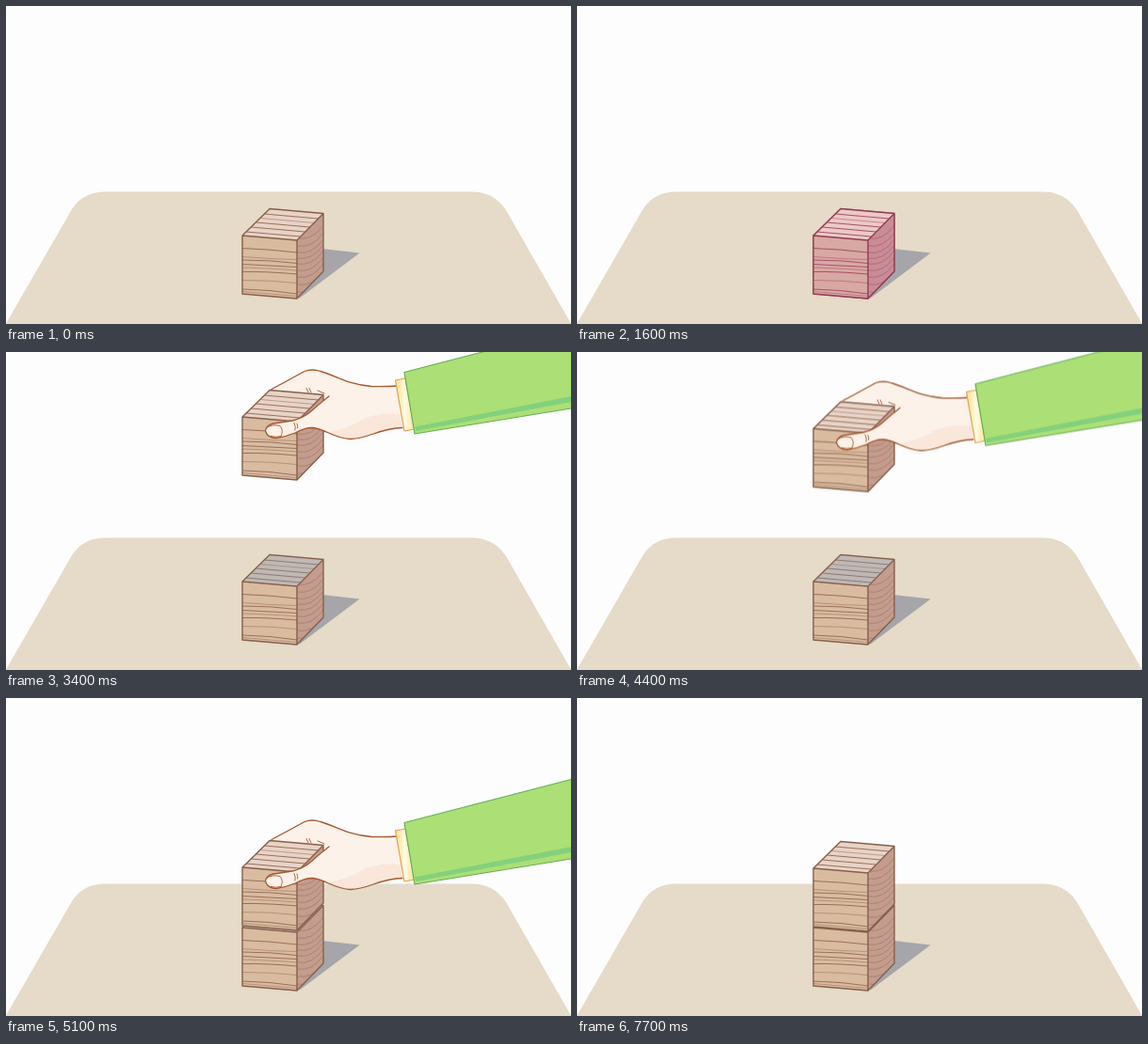
These frames come from a looping animation (600x338 px, 8000 ms). An HTML page:

```html
<!DOCTYPE html>
<html lang="en">
<head>
<meta charset="utf-8">
<title>Stacking blocks</title>
<style>
  html, body { margin: 0; width: 100%; height: 100%; overflow: hidden; background: #fdfdfe; }
  svg { display: block; width: 100vw; height: 100vh; }

  .block { --front: #d9bba0; --top: #e8d3c7; --side: #c49c8e; --edge: #85604b; --grain: #9a705c; }
  .block.pink { --front: #d89fa5; --top: #eec4c8; --side: #cc849b; --edge: #9a2759; --grain: #b0416f; }
  .front { fill: var(--front); }
  .top { fill: var(--top); }
  .side { fill: var(--side); }
  .edge { fill: none; stroke: var(--edge); stroke-width: 1.4; stroke-linejoin: round; }
  .grain { fill: none; stroke: var(--grain); stroke-width: 1; }
  .soft { stroke-width: .8; opacity: .7; }

  .skin { fill: #fcf2e9; }
  .blush { fill: #fae7da; }
  .line { fill: none; stroke: #a4572f; stroke-width: 1.3; stroke-linecap: round; stroke-linejoin: round; }
  .thin { stroke-width: .9; }

  .pink { animation: pulse 8s infinite; }
  .lower { animation: lower 8s infinite; }
  .appear { animation: appear 8s linear infinite; }
  .hand { animation: hand 8s linear infinite; }

  @keyframes pulse {
    0%, 3.75% { opacity: 0; animation-timing-function: cubic-bezier(.37, 0, .63, 1); }
    15.3125% { opacity: 1; animation-timing-function: cubic-bezier(.37, 0, .63, 1); }
    26.875%, 100% { opacity: 0; }
  }
  @keyframes lower {
    0%, 52.375% { transform: translateY(0); animation-timing-function: cubic-bezier(.37, 0, .63, 1); }
    64.5%, 100% { transform: translateY(112px); }
  }
  @keyframes appear {
    0%, 31.875% { opacity: 0; }
    41.875%, 100% { opacity: 1; }
  }
  @keyframes hand {
    0%, 31.875% { opacity: 0; }
    41.875%, 72.5% { opacity: 1; }
    86.25%, 100% { opacity: 0; }
  }
</style>
</head>
<body>
<svg viewBox="0 0 600 338" preserveAspectRatio="none">
  <defs>
    <linearGradient id="cuffFill">
      <stop offset="0" stop-color="#ffdf83"/>
      <stop offset=".5" stop-color="#fffbe6"/>
      <stop offset="1" stop-color="#fce293"/>
    </linearGradient>
    <clipPath id="sideClip"><path d="M309 249L337 220.500V282L309 311Z"/></clipPath>
    <clipPath id="blockClip"><path d="M250 69L279.500 39.500L338 44.500V107.500L309.500 137L250 132Z"/></clipPath>

    <g id="block">
      <path class="front" d="M251 244L309 249V311L251 306Z"/>
      <path class="top" d="M251 244L280 215.500L337 220.500L309 249Z"/>
      <path class="side" d="M309 249L337 220.500V282L309 311Z"/>
      <path class="grain" d="M251 257.500Q280 258.500 309 262M251 270Q282 270 309 273.500M251 274.500Q280 276 309 277.500M251 282.500Q276 282 309 285M251 301Q280 301.500 309 306"/>
      <path class="grain soft" d="M251 266.500Q280 269 309 269.500M251 278Q285 279 309 281M251 291.500Q282 291.500 309 294.500M251 303.500L309 308.500"/>
      <path class="grain" d="M274.500 221L331.500 226M265.500 230L322.500 235M260.500 235L317.500 240M255 240L312.500 245"/>
      <path class="grain soft" d="M270 225.500L327 230.500"/>
      <g class="grain soft" clip-path="url(#sideClip)">
        <path id="arc" d="M309 247Q325 250 337 233"/>
        <use href="#arc" y="8"/><use href="#arc" y="15"/><use href="#arc" y="21"/>
        <use href="#arc" y="27"/><use href="#arc" y="34"/><use href="#arc" y="41"/>
        <use href="#arc" y="49"/><use href="#arc" y="57"/>
      </g>
      <path class="edge" d="M251 244L280 215.500L337 220.500V282L309 311L251 306ZL309 249V311M309 249L337 220.500"/>
    </g>

    <path id="thumb" class="skin" d="M343 47Q334 54 324 63Q316 70 304 73L284 76Q276 78 275.500 84Q278 91.500 287 91.500Q297 90 307 86Q317 80.500 325 80.500C338 81 348 92 366 92.500V47Z"/>
    <g id="contour">
      <path class="line" d="M343 47Q334 54 324 63Q316 70 304 73L284 76Q276 78 275.500 84Q278 91.500 287 91.500Q297 90 307 86Q317 80.500 325 80.500C338 81 348 92 366 92.500C386 92 396 81 421 80.500"/>
      <path class="line thin" d="M277.500 80Q283 76.500 291 78.500Q295 83 292 89.500Q287 91 281 89.500M306 75.500Q308 79 307 83M309 76Q310.500 79 309.500 81"/>
    </g>
  </defs>

  <path fill="#e6dac8" d="M-2 341L70 216Q82 197.500 105 197.500H495Q518 197.500 531 217L602 341Z"/>
  <path fill="#a5a5aa" d="M336 258L375.500 262.500L311 311Z"/>

  <use class="block" href="#block"/>
  <use class="block pink" href="#block"/>
  <path class="appear" fill="#7d8c98" fill-opacity=".38" d="M252 243.500L280 216.500L336 221L309 248Z"/>

  <g class="lower">
    <g class="hand">
      <path class="skin" d="M282 39.500Q300 30 317 20.500Q325 17.500 334 20.500C350 25 362 34.500 388 36.500Q402 37 417 36L421 80.500C396 81 386 92 366 92.500C348 92 338 81 325 80.500L300 70Z"/>
      <use href="#thumb"/>
      <path class="blush" d="M341 85Q362 82 378 72Q394 64 419 66L421 80.500C396 81 386 92 366 92.500Q352 92 341 85Z"/>
      <path class="line" d="M282 39.500Q300 30 317 20.500Q325 17.500 334 20.500C350 25 362 34.500 388 36.500Q402 37 417 36"/>
      <path class="line thin" d="M319 38.500L321 43M322 38.500L324 43M331 41L338 44"/>
      <use href="#contour"/>
      <path fill="url(#cuffFill)" stroke="#e2a04f" stroke-width="1.2" stroke-linejoin="round" d="M413.500 30L424 28L434 82L423 84Z"/>
      <path fill="#acdf76" d="M423 21.500L606 -26V59L434 87Z"/>
      <path fill="#83d17c" d="M434 79.500L606 46V52L435 84Z"/>
      <path fill="none" stroke="#63b053" stroke-width="1.2" stroke-linejoin="round" d="M423 21.500L606 -26V59L434 87Z"/>
    </g>
    <g class="appear"><use class="block" href="#block" y="-175"/></g>
    <g class="hand"><g clip-path="url(#blockClip)"><use href="#thumb"/><use href="#contour"/></g></g>
  </g>
</svg>
</body>
</html>
```
